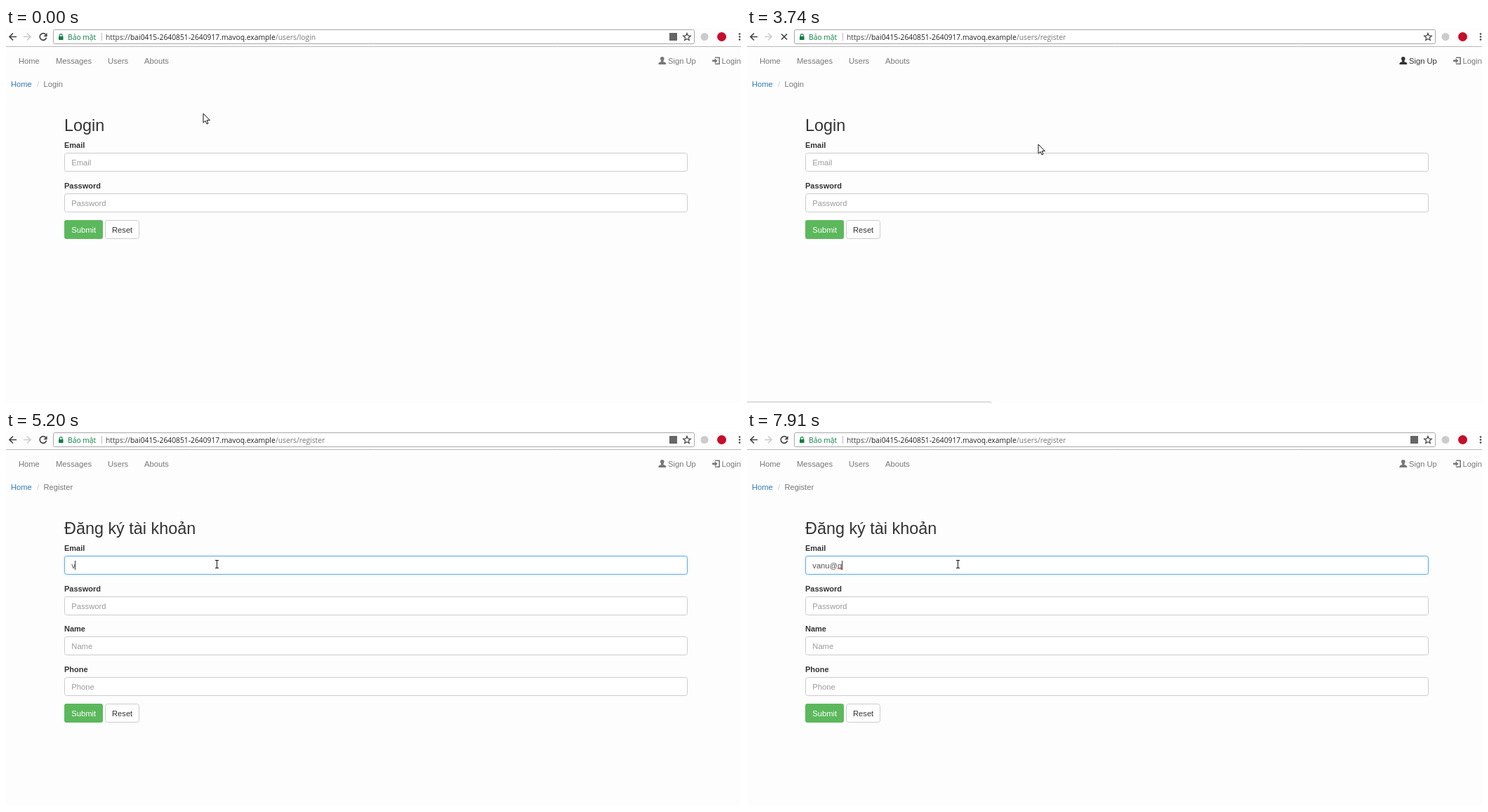
An HTML page with a canvas that plays this animation: 1047x535 px, repeating every 8000 ms.

```html
<!DOCTYPE html>
<html lang="vi">
<head>
<meta charset="utf-8">
<title>Register form</title>
<style>
html, body { margin: 0; width: 100%; height: 100%; overflow: hidden; background: #fdfdfd; }
canvas { display: block; }
</style>
</head>
<body>
<canvas id="stage" width="1047" height="535"></canvas>
<script>
const ctx = document.getElementById('stage').getContext('2d');
const LOOP = 8000;
const PAGE = '11.2px "Liberation Sans", Arial, sans-serif';
const BOLD = 'bold 11px "Liberation Sans", Arial, sans-serif';
const TITLE = '23.4px "Liberation Sans", Arial, sans-serif';
const CHROME = '10.3px "Open Sans", sans-serif';
const TIP = '9px "Open Sans", sans-serif';

// Times of the page events, in ms
const HOVER = 1190, STATUS = 1310, LOADING = 2020, NAVIGATE = 3030, RENDER = 4030, LOADED = 4260;
const TOOLTIP = [4530, 4780], FOCUS = 4780, FOCUSED = 4930, SUGGEST = [5390, 6730];
const CARET_OFF = [[6160, 6590], [7310, 7610]];
const TYPED = 'vanu@q';
const KEYS = [5200, 5590, 6590, 6880, 7610, 7910];

// Pointer: time, x, y, shape
const POINTER = [
  [0, 281, 122, 'arrow'], [150, 310, 128, 'arrow'], [299, 400, 137, 'arrow'], [447, 520, 140, 'arrow'],
  [596, 640, 134, 'arrow'], [744, 785, 104, 'arrow'], [893, 855, 79, 'arrow'], [1041, 930, 52, 'arrow'],
  [HOVER, 961, 42, 'hand'], [1490, 959, 43, 'hand'], [1660, 956, 45, 'hand'], [1840, 954, 47, 'hand'],
  [2200, 958, 47, 'arrow'], [3170, 910, 82, 'arrow'], [3310, 805, 80, 'arrow'], [3460, 640, 90, 'arrow'],
  [3600, 490, 150, 'arrow'], [3740, 415, 166, 'arrow'], [3880, 360, 176, 'arrow'],
  [RENDER, 325, 188, 'beam'], [4400, 300, 190, 'beam']
];
const SHAPES = {
  arrow: new Path2D('M0 0V13.2L3 10.4L5 14.9L7 14L5.1 9.7H9.4Z'),
  hand: new Path2D('M4 9V1.3Q4 .4 4.9 .4T5.8 1.3V5.5Q6.7 4.6 7.6 5.6Q8.6 4.8 9.5 6Q10.8 5.6 11.3 6.8V11' +
    'Q11.3 13 10 14.5V16H4.8V14.5L.8 9.8Q.3 8.6 1.4 8.2T4 9.4ZM5.8 5.5V8.5M7.6 5.6V8.5M9.5 6V8.8'),
  beam: new Path2D('M-2 -5.5H3M.5 -5.5V5.5M-2 5.5H3')
};

const within = (t, [from, to]) => t >= from && t < to;

function text(str, x, y, color = '#777', font = PAGE) {
  ctx.font = font;
  ctx.fillStyle = color;
  ctx.fillText(str, x, y);
}

function box(x, y, w, h, fill, stroke, radius = 3) {
  ctx.beginPath();
  ctx.roundRect(x + .5, y + .5, w - 1, h - 1, radius);
  ctx.fillStyle = fill;
  ctx.fill();
  ctx.strokeStyle = stroke;
  ctx.lineWidth = 1;
  ctx.stroke();
}

function line(d, color, width = 1) {
  ctx.strokeStyle = color;
  ctx.lineWidth = width;
  ctx.stroke(new Path2D(d));
}

function shape(d, color) {
  ctx.fillStyle = color;
  ctx.fill(new Path2D(d));
}

function dot(x, y, r, color) {
  ctx.beginPath();
  ctx.arc(x, y, r, 0, 2 * Math.PI);
  ctx.fillStyle = color;
  ctx.fill();
}

function star(cx, cy, r) {
  ctx.beginPath();
  for (let i = 0; i < 10; i++) {
    const a = (i / 5 - .5) * Math.PI, d = i % 2 ? r * .45 : r;
    ctx.lineTo(cx + d * Math.cos(a), cy + d * Math.sin(a));
  }
  ctx.closePath();
  ctx.strokeStyle = '#444';
  ctx.lineWidth = 1.2;
  ctx.stroke();
}

function drawToolbar(t) {
  line('M15 12.5H5M10 7.5L5 12.5L10 17.5', '#444', 1.7);
  line('M25 12.5H35M30 7.5L35 12.5L30 17.5', '#ccc', 1.7);
  if (within(t, [LOADING, LOADED])) {
    line('M49 8.5L57 16.5M57 8.5L49 16.5', '#444', 1.7);
  } else {
    line('M56.5 9.2A4.8 4.8 0 1 0 57.6 13.8', '#444', 1.7);
    shape('M58.6 7V12.2H53.4Z', '#444');
  }

  box(67, 2, 914, 21, '#fff', '#a8a8a8', 2);
  shape('M75 12H81.5V17H75Z', '#0b8043');
  line('M76.4 12V10.4A1.85 1.85 0 0 1 80.1 10.4V12', '#0b8043', 1.2);
  text('Bảo mật', 88, 16.5, '#0b8043', CHROME);
  line('M136.5 7V18', '#bbb');
  text('https://', 142, 16.5, '#444', CHROME);
  text('bai0415-2640851-2640917.mavoq.example', 177, 16.5, '#222', CHROME);
  text(t < NAVIGATE ? '/users/login' : '/users/register', 384, 16.5, '#777', CHROME);

  if (!within(t, [NAVIGATE, LOADED])) shape('M945 7H956V18H945Z', '#666');
  star(970, 13, 5.6);
  dot(995, 12.5, 5.5, '#ccc');
  dot(1019.5, 12.5, 6.5, '#c70d2c');
  for (const y of [8.5, 12.5, 16.5]) dot(1045, y, 1.3, '#444');
  line('M0 26.5H1047', '#b8b8b8');
}

function drawNav(t) {
  text('Home', 18, 51);
  text('Messages', 71, 51);
  text('Users', 145, 51);
  text('Abouts', 197, 51);
  const color = within(t, [HOVER, RENDER]) ? '#333' : '#777';
  shape('M929.5 52V50.3Q930 49 933.2 48V47Q932 45.5 932 43.6Q932 41 934.8 41T937.6 43.6' +
    'Q937.6 45.5 936.4 47V48Q939.6 49 940.2 50.3V52Z', color);
  text('Sign Up', 943, 51, color);
  line('M1010 42.2H1016.2V51.2H1010', '#777', 1.6);
  shape('M1006 45.6H1009.5V43.2L1013.6 46.8L1009.5 50.4V48H1006Z', '#777');
  text('Login', 1019.5, 51);

  text('Home', 7, 84, '#337ab7');
  text('/', 44, 84, '#ccc');
  text(t < RENDER ? 'Login' : 'Register', 53.5, 84);
}

function drawField(name, y, focus, value) {
  text(name, 83, y - 7, '#333', BOLD);
  ctx.save();
  if (focus) {
    ctx.shadowColor = `rgba(102,175,233,${.3 * focus})`;
    ctx.shadowBlur = 3;
  }
  box(83, y, 888, 27, '#fff', focus ? '#66afe9' : '#ccc');
  ctx.restore();
  text(value || name, 93.3, y + 17.5, value ? '#555' : '#999');
}

function drawForm(t) {
  const register = t >= RENDER;
  const value = TYPED.slice(0, KEYS.filter(k => t >= k).length);
  text(register ? 'Đăng ký tài khoản' : 'Login', 83, 146.5, '#333', TITLE);

  const fields = register ? ['Email', 'Password', 'Name', 'Phone'] : ['Email', 'Password'];
  fields.forEach((name, i) => {
    const active = i === 0 && t >= FOCUS;
    const focus = active ? (t < FOCUSED ? .5 : 1) : 0;
    drawField(name, Math.round(178 + 57.6 * i), focus, active ? value : '');
  });

  const y = register ? 389 : 274;
  box(83, y, 55, 27, '#5cb85c', '#5cb85c', 2);
  text('Submit', 93.3, y + 17.5, '#fff');
  box(141, y, 49, 27, '#fff', '#ccc');
  text('Reset', 151, y + 17.5, '#333');

  if (t >= FOCUS && !CARET_OFF.some(range => within(t, range))) {
    ctx.font = PAGE;
    const x = Math.floor(93.3 + ctx.measureText(value).width);
    line(`M${x + .5} 185V198`, '#333');
  }
  if (value === TYPED) line('M128 197l1.5 -1l1.5 1l1.5 -1l1.5 1l1 -1', '#f00', .7);

  if (within(t, SUGGEST)) {
    box(83, 205, 888, 20, '#fff', '#d4d4d4', 0);
    text('va@q.example', 90, 218, '#111', 'bold ' + TIP);
  }
}

function drawTooltip() {
  const fill = ctx.createLinearGradient(0, 192, 0, 207);
  fill.addColorStop(0, '#fff');
  fill.addColorStop(1, '#e4e5f0');
  ctx.save();
  ctx.shadowColor = 'rgba(0,0,0,.35)';
  ctx.shadowBlur = 2;
  ctx.shadowOffsetX = ctx.shadowOffsetY = 2;
  box(316, 192, 132, 15, fill, '#767676', 1);
  ctx.restore();
  // Repaint the face, which the border's shadow has darkened
  box(316, 192, 132, 15, fill, '#767676', 1);
  text('Vui lòng điền vào trường này.', 321, 202.5, '#444', TIP);
}

function drawPointer(t) {
  const [, x, y, kind] = POINTER.findLast(p => t >= p[0]);
  ctx.save();
  ctx.translate(x, y);
  ctx.lineJoin = 'round';
  ctx.lineWidth = 1;
  ctx.strokeStyle = '#111';
  ctx.fillStyle = '#fff';
  if (kind !== 'beam') ctx.fill(SHAPES[kind]);
  ctx.stroke(SHAPES[kind]);
  ctx.restore();
}

function draw(t) {
  ctx.fillStyle = '#fdfdfd';
  ctx.fillRect(0, 0, 1047, 535);
  drawToolbar(t);
  drawNav(t);
  drawForm(t);
  if (within(t, [STATUS, RENDER])) line('M0 533.5H346Q348 533.5 348 535', '#c4c4c4');
  if (within(t, TOOLTIP)) drawTooltip();
  drawPointer(t);
}

const start = performance.now();
function tick() {
  draw((performance.now() - start) % LOOP);
  requestAnimationFrame(tick);
}
tick();
</script>
</body>
</html>
```
